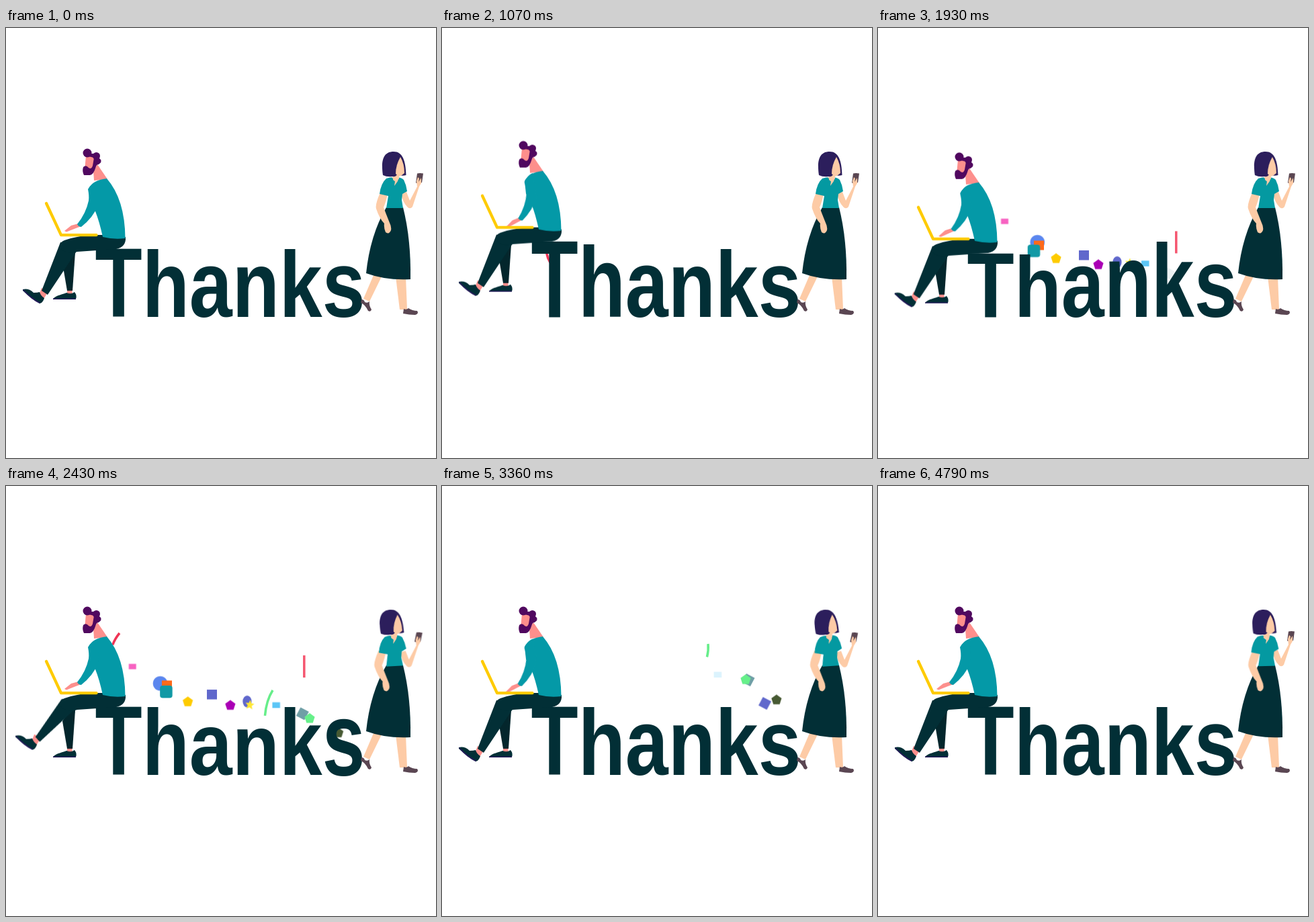
An HTML page for the animation above (4.87 s loop, 640 px wide and 640 px high).

```html
<!DOCTYPE html>
<html lang="en">
<head>
<meta charset="utf-8">
<title>Thanks</title>
<style>
  html, body { margin: 0; height: 100%; overflow: hidden; background: #fff; }
  svg { display: block; width: 100vw; height: 100vh; }

  :root { --loop: 4870ms; --sine: cubic-bezier(.37, 0, .63, 1); }

  .word { font: bold 140px "Liberation Sans", Arial, sans-serif; fill: #022f36; }
  .word text { animation: stretch var(--loop) var(--sine) calc(var(--i) * 245ms) infinite; }
  @keyframes stretch {
    0%, 9.9% { transform: scaleY(1); }
    23.2% { transform: scaleY(1.117); }
    34.6% { transform: scaleY(.91); }
    46.9%, 100% { transform: scaleY(1); }
  }

  .man { animation: ride var(--loop) var(--sine) infinite; }
  @keyframes ride {
    0%, 9.9% { transform: translateY(0); }
    23.2% { transform: translateY(-11.6px); }
    34.6% { transform: translateY(9px); }
    46.9%, 100% { transform: translateY(0); }
  }
  .typing {
    transform-origin: 130px 235px;
    animation: type calc(var(--loop) / 2) var(--sine) infinite;
  }
  @keyframes type { 50% { transform: rotate(-7.5deg); } }
  .kick { animation: kick var(--loop) var(--sine) infinite; }
  .shin { transform-origin: 92px 321px; --kick: rotate(13.5deg) scale(.89); }
  .foot { --kick: translate(-11px, -17.5px); }
  @keyframes kick {
    0%, 38.5% { transform: none; }
    50.5% { transform: var(--kick); }
    58.7%, 100% { transform: none; }
  }

  .sway { animation: sway var(--loop) var(--sine) infinite; }
  @keyframes sway {
    0%, 38% { transform: none; }
    60.5% { transform: translate(var(--x), var(--y, 0px)) rotate(var(--r, 0deg)); }
    81.5%, 100% { transform: translate(var(--ex, -1px), 0) rotate(var(--er, 0deg)); }
  }
  .head { transform-origin: 578px 226px; --x: -5px; --r: -5deg; --ex: -2.2px; --er: -1.5deg; }
  .shirt { transform-origin: 578px 268px; --x: 0px; --r: -5.5deg; --ex: 0px; --er: -1.5deg; }
  .left-arm { --x: -4.5px; --ex: .5px; }
  .right-arm { --x: -2.5px; --y: 2.5px; }
  .phone { transform-origin: 615px 224px; --x: -3px; --y: 3px; --r: 6deg; }

  .bits > * { animation: rise var(--loop) linear var(--d) infinite backwards; }
  @keyframes rise {
    0% { opacity: 0; transform: none; }
    3%, 31% { opacity: 1; }
    35%, 100% { opacity: 0; transform: translate(var(--x, 0px), var(--y)); }
  }
  .ribbons { fill: none; stroke-width: 3.5; }
  .ribbons > * {
    stroke-dasharray: var(--len, 33) 400;
    stroke-dashoffset: 41;
    animation: run var(--loop) linear var(--d) infinite backwards;
  }
  @keyframes run {
    0% { stroke-dashoffset: 41; }
    39%, 100% { stroke-dashoffset: -150; }
  }
</style>
</head>
<body>
<svg viewBox="0 0 640 640">
  <defs>
    <path id="pent" d="M0-8 7.6-2.5 4.7 6.5-4.7 6.5-7.6-2.5z"/>
    <path id="tile" d="M-2.9-9.5 9.5-2.9 2.9 9.5-9.5 2.9z"/>
    <path id="star" d="M1-7 2.5-2 7-1 3 2 4 7-.5 4-5 6-3 1-6-3-1.5-2.5z"/>
  </defs>

  <g class="bits">
    <rect x="183.5" y="315.5" width="11" height="8" fill="#f762c1" style="--d:1100ms;--x:-1px;--y:-65px"/>
    <circle cx="247.5" cy="352.5" r="10.8" fill="#5b86ee" style="--d:1255ms;--x:-26px;--y:-85px"/>
    <rect x="232" y="353" width="15" height="14" fill="#ff6a1a" style="--d:1255ms;--y:-92px"/>
    <rect x="214" y="357" width="18.5" height="18.5" rx="4" fill="#1199a5" style="--d:1255ms;--x:22px;--y:-87px"/>
    <use href="#pent" x="257.5" y="373" fill="#fecb00" style="--d:1255ms;--x:19px;--y:-75px"/>
    <rect x="299" y="355" width="15" height="14.5" fill="#6068cc" style="--d:1500ms;--y:-95px"/>
    <use href="#pent" x="323.5" y="372" fill="#aa00b5" style="--d:1550ms;--x:20px;--y:-88px"/>
    <ellipse cx="354" cy="367" rx="6.6" ry="8.7" fill="#6068cc" style="--d:1600ms;--x:10px;--y:-95px"/>
    <use href="#star" x="380.5" y="363" fill="#ffe833" style="--d:1650ms;--x:-39px;--y:-82px"/>
    <rect x="390" y="357.5" width="11.5" height="8.5" fill="#5cc6f6" style="--d:1700ms;--x:15px;--y:-83px"/>
    <use href="#tile" x="433" y="367" fill="#6f9fa6" style="--d:1910ms;--x:27px;--y:-92px"/>
    <use href="#pent" x="452" y="376" fill="#66f08a" style="--d:1950ms;--y:-106px"/>
    <use href="#tile" x="489.5" y="369" fill="#6068cc" style="--d:2270ms;--x:-14px;--y:-71px"/>
    <use href="#pent" x="494" y="376" fill="#475a33" style="--d:2270ms;--x:6px;--y:-90px"/>
  </g>
  <g class="ribbons">
    <path pathLength="140" d="M161 349C146 325 165 300 158 270 152 250 158 232 169 219" stroke="#ef3455" style="--d:840ms"/>
    <path pathLength="150" d="M443.8 385V235" stroke="#f5566f" style="--d:1030ms"/>
    <path pathLength="146" d="M386 374C382 335 390 315 397 304Q403 294 397 281C392 270 391 266 394 256Q397 246 396 235" stroke="#66ee8a" style="--d:1700ms;--len:41"/>
  </g>

  <g class="word" transform="translate(132.6 430) scale(.82 1)">
    <g transform="scale(1 1.047)"><text style="--i:0">T</text></g>
    <text x="85.5" style="--i:1">h</text>
    <text x="171" style="--i:2">a</text>
    <text x="248.9" style="--i:3">n</text>
    <text x="334.4" style="--i:4">k</text>
    <text x="412.3" style="--i:5">s</text>
  </g>

  <g class="man">
    <!-- far leg -->
    <path d="M91 388h7l1 9-8-1z" fill="#fd8f8c"/>
    <path d="M100 325 84 350 91 391H99L103 334z" fill="#03262c"/>
    <path d="M70 403C76 397 84 397 90 394Q97 397 102 393 106 398 104 403z" fill="#022f36"/>
    <path d="M70 402.5H104V404H70z" fill="#241a5a"/>
    <!-- near leg -->
    <g class="kick foot">
      <path d="M53 387 63 392 55 405 48 400z" fill="#fd8f8c"/>
      <path d="M25 389Q34 387 41 394 47 394 50 393 52 399 57 402 55 409 50 410 38 403 25 391z" fill="#022f36"/>
      <path d="M25 390Q37 404 50 410L51 408.5Q38 402 26 389z" fill="#241a5a"/>
    </g>
    <path class="kick shin" d="M81 319 53 391 62 397 104 334 106 316z" fill="#022f36"/>
    <path d="M143 308Q112 307 87 316 80 318 81 328 92 338 106 333 135 331 164 329 179 326 178 311z" fill="#022f36"/>
    <!-- head -->
    <path d="M136 203 151 225 131 227 130 212z" fill="#fd8f8c"/>
    <path d="M119 190H131V212H117z" fill="#fd8f8c"/>
    <path d="M115 207Q119 203 123 208 127 211 129 205L131 193Q136 188 139 194 143 200 138 203 135 203 134 206 130 219 125 219H116Q113 213 115 207z" fill="#50085f"/>
    <g fill="#50085f">
      <circle cx="121" cy="186" r="6.5"/>
      <circle cx="134.5" cy="190.5" r="5.5"/>
      <circle cx="138" cy="198" r="3.5"/>
      <path d="M118 187H135V195Q126 190 118 192z"/>
    </g>
    <!-- torso and arm -->
    <path d="M123 239Q130 226 150 224 177 255 177.5 313Q160 315 144 311 139 288 133 273L125 258z" fill="#0499a7"/>
    <g class="typing">
      <path d="M108 291 97 294 87 302 90 303.5 104 298 112 295z" fill="#fd8f8c"/>
      <path d="M122 240Q128 230 136 228L138 262Q130 282 112 296 108 296 106 292 119 276 123 257 124 250 122 240z" fill="#0499a7"/>
    </g>
    <path d="M60 261 82 308.2H134.5" fill="none" stroke="#fecb00" stroke-width="4.3" stroke-linecap="round" stroke-linejoin="round"/>
  </g>

  <g class="woman">
    <!-- legs -->
    <g fill="#fdcba6">
      <path d="M547 368H560L541 407 532 403z"/>
      <path d="M580 370H595L597 419H586z"/>
    </g>
    <g fill="#5a4652">
      <path d="M529 404Q533 404 534 408 538 410 541 407 540 413 544 419 543 423 539 421 534 411 528 409z"/>
      <path d="M592 418Q596 420 599 417 605 421 612 421 615 425 609 427 600 427 591 425z"/>
    </g>
    <!-- arms -->
    <path class="sway phone" d="M612 216.5Q616 215.5 621 216.5L619 230Q615 231.5 610 230.5z" fill="#5a4652"/>
    <path class="sway right-arm" d="M588 246 596 244 601 257 612 236 611 228 613 222 615 224 614 229 618 223 618 231 615 236 605 266Q602 270 598 267 590 259 588 246z" fill="#fdcba6"/>
    <path d="M566 267H591Q603 315 602 374 566 376 536 365 542 308 566 267z" fill="#022f36"/>
    <path class="sway left-arm" d="M557 245Q549 263 551 269 556 284 563 291 562 297 565 304 570 308 573 301 574 296 571 290 565 275 562 267 566 258 568 246z" fill="#fdcba6"/>
    <!-- shirt -->
    <g class="sway shirt">
      <path d="M566 224Q574 221 580 223 587 221 592 226 596 234 597 243L590 247 589 256 591 268H566L569 250 556 247Q558 231 566 224z" fill="#0499a1"/>
      <path d="M574 222H584L583 228 578 235 579 228z" fill="#fdcba6"/>
    </g>
    <!-- head -->
    <g class="sway head">
      <path d="M578 212H585V224L581 230 576 226z" fill="#fdcba6"/>
      <path d="M561 219C558 198 561 184 577 184 590 184 595 197 595.5 219Q589 221 582 218 580 222 575 221 567 222 561 219z" fill="#2c1e5c"/>
      <path d="M587 192Q580 204 580 217L585 221Q590 219 593 216 593 202 587 192z" fill="#fdcba6"/>
    </g>
  </g>
</svg>
</body>
</html>
```
